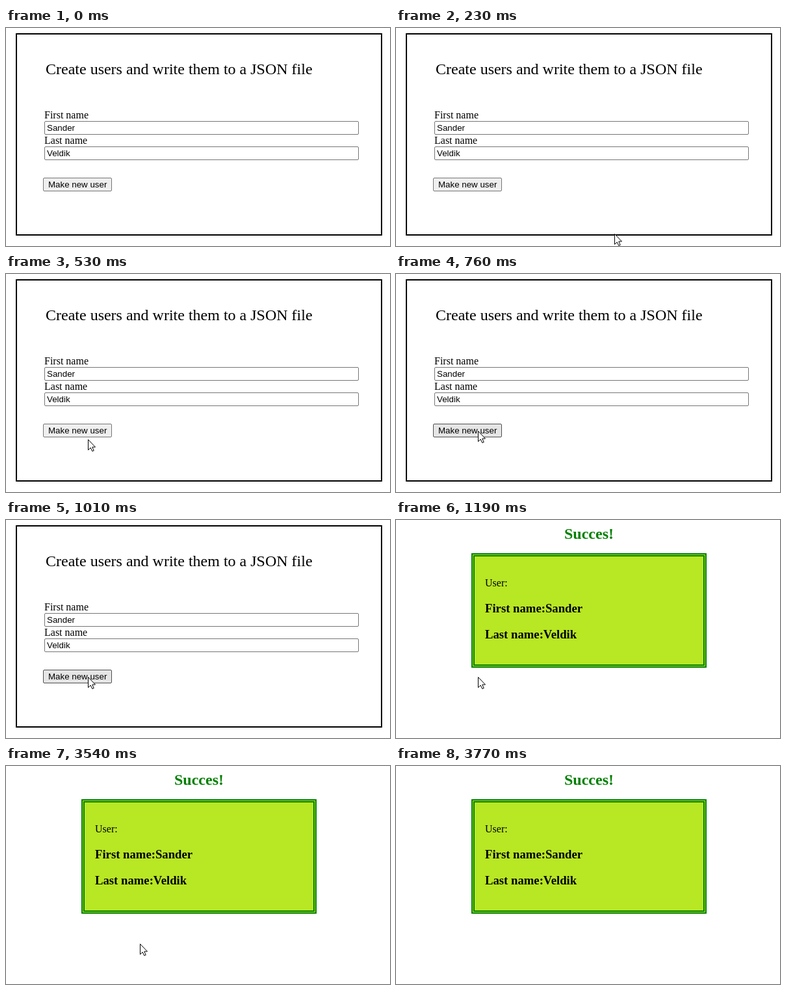
These frames come from a looping animation (591x335 px, 4480 ms). An HTML page:

```html
<!DOCTYPE html>
<html lang="en">
<head>
<meta charset="utf-8">
<title>Create users</title>
<style>
  html, body { margin: 0; width: 100%; height: 100%; overflow: hidden; background: #fff; }
  svg { display: block; }
  text { font-family: "Liberation Serif", "Times New Roman", serif; font-size: 16px; }
  .title { font-size: 24px; }
  .control { font-family: "Liberation Sans", Arial, sans-serif; font-size: 13.333px; }
  .field { fill: #fff; stroke: #767676; }
  .heading { font-size: 24px; font-weight: bold; fill: green; text-anchor: middle; }
  .result { font-size: 18.72px; font-weight: bold; }
  #button { fill: #efefef; stroke: #767676; }
  #button.hover { fill: #e5e5e5; stroke: #4f4f4f; }
  #button.active { fill: #f5f5f5; stroke: #8d8d8d; }
  #cursor { fill: #fff; stroke: #000; stroke-linejoin: round; }
</style>
</head>
<body>
<svg width="591" height="335" viewBox="0 0 591 335">
  <g id="form">
    <rect x="16" y="9" width="562" height="309" fill="none" stroke="#000" stroke-width="2"/>
    <text class="title" x="61" y="71">Create users and write them to a JSON file</text>
    <text x="59" y="139">First name</text>
    <rect class="field" x="59.5" y="143.5" width="483" height="20" rx="1.5"/>
    <text class="control" x="63" y="158">Sander</text>
    <text x="59" y="178">Last name</text>
    <rect class="field" x="59.5" y="182.5" width="483" height="20" rx="1.5"/>
    <text class="control" x="63" y="197">Veldik</text>
    <rect id="button" x="57.5" y="230.5" width="105" height="20" rx="1.5"/>
    <text class="control" x="65" y="245">Make new user</text>
  </g>
  <g id="success" visibility="hidden">
    <text class="heading" x="297" y="29">Succes!</text>
    <rect x="116" y="51" width="362" height="176" fill="#b8e724"/>
    <g fill="none" stroke="green" stroke-width="2">
      <rect x="117" y="52" width="360" height="174"/>
      <rect x="120" y="55" width="354" height="168"/>
    </g>
    <text x="137" y="102">User:</text>
    <text class="result" x="137" y="142">First name:Sander</text>
    <text class="result" x="137" y="182">Last name:Veldik</text>
  </g>
  <path id="cursor" visibility="hidden" d="M.5 .5V16.5L4.2 13L6.8 18.4L9.2 17.4L6.8 12H11.5Z"/>
</svg>
<script>
  const LOOP = 4480;
  const ENTER = 230, PRESS = 910, RELEASE = 1010, SUBMIT = 1190, LEAVE = 3310, GONE = 3770;
  const REST = { x: 126, y: 241 };

  const [form, success, button, cursor] =
    ["form", "success", "button", "cursor"].map(id => document.getElementById(id));
  const show = (el, on) => el.setAttribute("visibility", on ? "visible" : "hidden");

  // Progress from 0 to 1 in held steps, as a screen recorder samples it.
  function stepped(t, start, duration, steps) {
    const step = Math.floor((t - start) / duration * steps);
    return Math.min(1, Math.max(0, step / steps));
  }

  // The pointer slows down towards the button, then speeds up on its way out.
  function pointerAt(t) {
    if (t < ENTER || t >= GONE) return null;
    if (t < LEAVE) {
      const left = 1 - stepped(t, ENTER - 10, 525, 7);
      return {
        x: Math.round(REST.x + 210 * left ** 7.2),
        y: Math.round(REST.y + 75 * left ** 2.1)
      };
    }
    const gone = stepped(t, LEAVE, GONE - LEAVE, 6);
    return {
      x: Math.round(REST.x + 1 + 630 * gone ** 3),
      y: Math.round(REST.y + 120 * gone ** 1.9)
    };
  }

  function buttonState(t, tip) {
    if (t >= PRESS && t < RELEASE) return "active";
    return tip && tip.x < 163 && tip.y < 251 ? "hover" : "";
  }

  function draw(t) {
    const tip = pointerAt(t);
    show(form, t < SUBMIT);
    show(success, t >= SUBMIT);
    show(cursor, tip);
    if (tip) cursor.setAttribute("transform", `translate(${tip.x} ${tip.y})`);
    button.setAttribute("class", buttonState(t, tip));
  }

  const origin = performance.now();
  function tick() {
    draw((performance.now() - origin) % LOOP);
    requestAnimationFrame(tick);
  }
  draw(0);
  requestAnimationFrame(tick);
</script>
</body>
</html>
```
